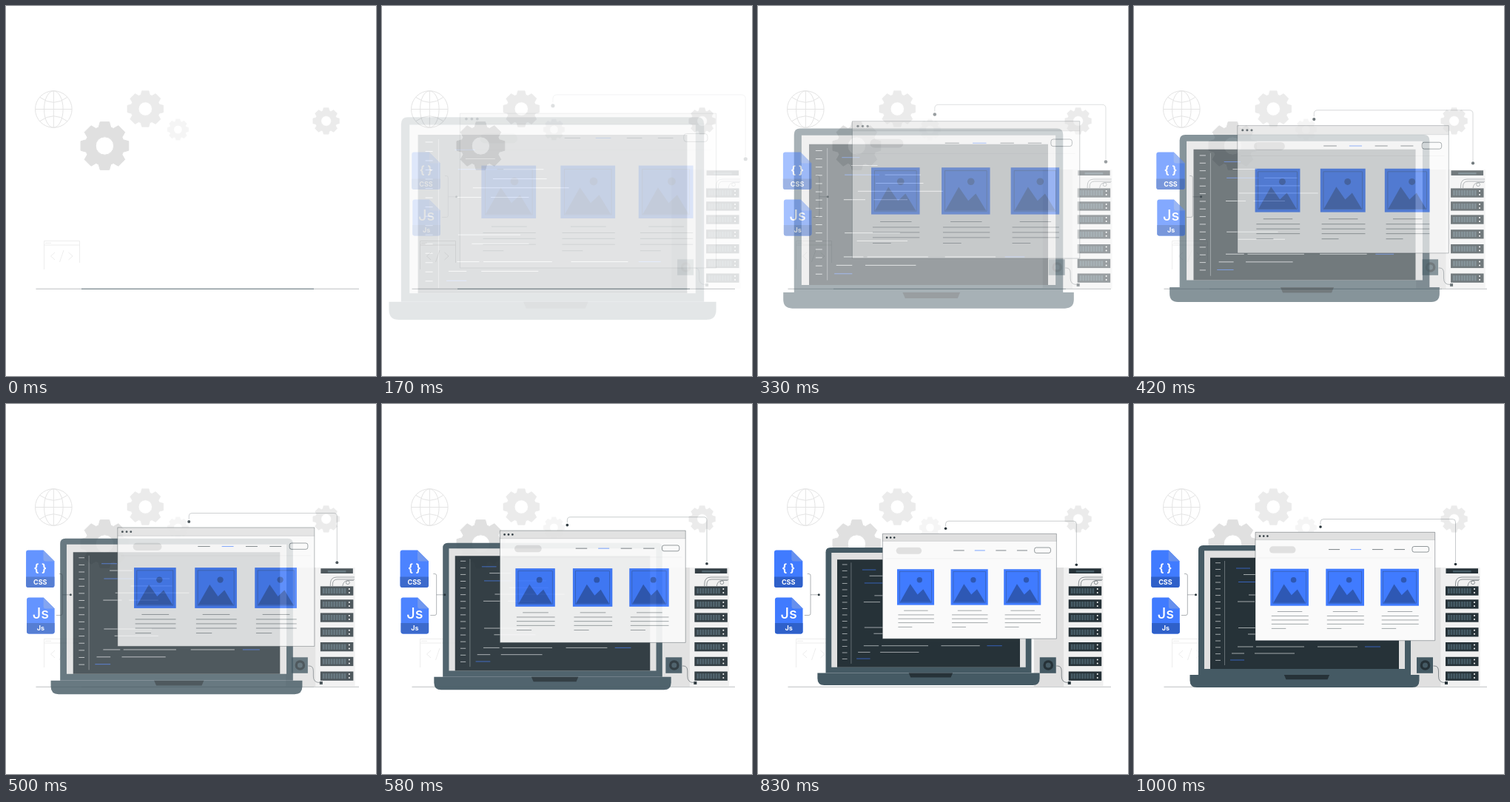
An HTML page for the animation above (1040 ms loop, 500 by 500 pixels).

```html
<!DOCTYPE html>
<html lang="en">
<head>
<meta charset="utf-8">
<title>Web development</title>
<style>
  html, body { margin: 0; width: 100%; height: 100%; overflow: hidden; background: #fff; }
  svg { display: block; width: 100vw; height: 100vh; }
  text { font-family: Inter, Roboto, sans-serif; text-anchor: middle; fill: #fff; }
  .thin { fill: none; stroke: #263238; stroke-width: .5; }
</style>
</head>
<body>
<svg viewBox="0 0 500 500">
  <g id="backdrop">
    <g fill="none" stroke="#e4e4e4" stroke-width="1">
      <circle cx="64.3" cy="139.5" r="24.8"/>
      <ellipse cx="64.3" cy="139.5" rx="12.8" ry="24.8"/>
      <path d="M64.3 114.700V164.300M39.500 139.500H89.100M46 123.500Q64.300 137 82.600 123.500M46 155.500Q64.300 142 82.600 155.500"/>
    </g>
    <g fill="none" stroke="#ebebeb" stroke-width=".9">
      <path d="M51.500 356V317.500H99.500V347M51.500 323H99.500M53 320.300H61"/>
      <path d="M66 333L60.500 338L66 343M78 330L72.500 346M84.500 333L90 338L84.500 343"/>
    </g>
    <path d="M40.500 382.300H477" stroke="#263238" stroke-width=".8" opacity=".38"/>
    <path id="midline" d="M102 382.300H416" stroke="#455a64" stroke-width=".9"/>
  </g>

  <g id="server">
    <path d="M374 221H415V382H374z" fill="#e0e0e0"/>
    <path d="M414.500 221H467.800V382H414.500z" fill="#f0f0f0"/>
    <path d="M421.500 222.300H465V229H421.500z" fill="#263238"/>
    <path d="M431 225H455.500V227.500H431z" fill="#455a64"/>
    <g class="thin">
      <path d="M434.500 246V243Q434.500 234 443 234H467M437.500 246V244Q437.500 237 444 237H467"/>
      <circle cx="458" cy="241.300" r="2.400"/>
      <path d="M451 246Q452 239 458 238.500H466"/>
      <path d="M404.500 354H406Q411.500 354 411.500 361V368Q411.500 376.500 420 376.500"/>
    </g>
    <path d="M420 375H424V379H420z" fill="#263238"/>
    <path d="M382 342.300H404V363.800H382z" fill="#455a64"/>
    <circle cx="393.500" cy="353" r="6.800" fill="#263238"/>
    <circle cx="393.500" cy="353" r="3.500" fill="#455a64"/>
  </g>

  <g id="laptop">
    <path d="M87 366V197.500Q87 191 93.500 191H367.500Q374 191 374 197.500V366z" fill="#455a64"/>
    <path d="M95 198.300H366V358H95z" fill="#e0e0e0"/>
    <path d="M103 207.800H358V358H103z" fill="#263238"/>
    <path d="M75.500 366H385.500V373.500Q385.500 383 376 383H85Q75.500 383 75.500 373.500z" fill="#455a64"/>
    <path d="M202.800 366H264.200L261.500 372.300H205.500z" fill="#263238"/>
    <path d="M122.500 212V353" stroke="#dfe3e5" stroke-width=".5" opacity=".7"/>
    <g id="code" stroke-width=".65"/>
  </g>

  <g id="browser">
    <path d="M164 173.300H406.700V319.700H164z" fill="#fafafa"/>
    <path d="M164 173.300H406.700V183.600H164z" fill="#e0e0e0"/>
    <path class="thin" opacity=".75" d="M164 173.300H406.700V319.700H164z"/>
    <path class="thin" opacity=".3" d="M164 183.600H406.700"/>
    <g fill="#263238">
      <circle cx="170" cy="178.500" r="1.300"/>
      <circle cx="175.200" cy="178.500" r="1.300"/>
      <circle cx="180.400" cy="178.500" r="1.300"/>
      <circle cx="252" cy="166" r="1.800"/>
      <circle cx="434.500" cy="216.500" r="1.800"/>
    </g>
    <rect x="183" y="192.300" width="35.500" height="9.300" rx="4.650" fill="#e0e0e0"/>
    <path d="M168 208H402" stroke="#ebebeb" stroke-width=".6"/>
    <path d="M263 196.600H278M322 196.600H336.500M351.500 196.600H366" stroke="#263238" stroke-width=".6"/>
    <path d="M292.500 196.600H307" stroke="#407bff" stroke-width=".7"/>
    <rect class="thin" x="376" y="192.500" width="22.500" height="7.600" rx="2.500"/>
    <path class="thin" opacity=".5" d="M252 163V159.500Q252 155.600 256 155.600H430.500Q434.500 155.600 434.500 159.500V214"/>
    <g id="cards"/>
  </g>

  <g id="docs">
    <path class="thin" opacity=".75" d="M68 229.500H70Q72.300 229.500 72.300 232V283Q72.300 285.500 70 285.500H64M72.300 257.800H83"/>
    <circle cx="83.500" cy="257.800" r="1.500" fill="#263238"/>
  </g>
</svg>
<script>
  const LOOP = 1040, STEP = 1000 / 24, LEAD = .83;
  const $ = id => document.getElementById(id);

  function add(parent, tag, attrs, text) {
    const el = document.createElementNS('http://www.w3.org/2000/svg', tag);
    for (const key in attrs) el.setAttribute(key, attrs[key]);
    if (text) el.textContent = text;
    parent.appendChild(el);
    return el;
  }

  function gear(cx, cy, r, hole, fill) {
    const pts = [];
    for (let i = 0; i < 8; i++) {
      const mid = i * Math.PI / 4 - Math.PI / 2;
      for (const [turn, size] of [[-.32, .79], [-.19, .99], [.19, .99], [.32, .79]]) {
        const a = mid + turn;
        pts.push((cx + r * size * Math.cos(a)).toFixed(2) + ' ' + (cy + r * size * Math.sin(a)).toFixed(2));
      }
    }
    const ring = `M${cx - hole} ${cy}a${hole} ${hole} 0 1 0 ${2 * hole} 0a${hole} ${hole} 0 1 0 ${-2 * hole} 0z`;
    add($('backdrop'), 'path', {
      d: `M${pts.join('L')}z${ring}`, fill, 'fill-rule': 'evenodd',
      stroke: fill, 'stroke-width': r * .03, 'stroke-linejoin': 'round'
    });
  }
  gear(133.4, 189, 33.3, 12.2, '#e0e0e0');
  gear(188.3, 139, 25, 9.2, '#ebebeb');
  gear(232.4, 167, 14.6, 5.6, '#f5f5f5');
  gear(432.6, 155.4, 18.3, 6.8, '#ebebeb');

  // Server racks
  for (const y of [246.4, 264.3, 282.4, 302.2, 322, 341.8, 361.5]) {
    const rack = add($('server'), 'g', { transform: `translate(421 ${y})` });
    add(rack, 'rect', { width: 44.5, height: 12.3, fill: '#263238' });
    for (let i = 0; i < 9; i++)
      add(rack, 'rect', { x: 3 + i * 3.6, y: 2.6, width: 2.7, height: 7.2, fill: '#455a64' });
    for (const dy of [3.6, 8.6])
      add(rack, 'circle', { cx: 39, cy: dy, r: 1, fill: '#fff' });
  }

  // Code on the laptop screen: x1, x2, y, is blue
  const code = [
    [138, 157, 222, 1], [148, 176, 230.5], [141, 178, 240.5, 1], [184, 222, 240.5],
    [174, 225, 249.5], [155, 246, 258], [140, 163, 267], [172, 208, 267], [141, 200, 302.5],
    [154, 208, 311], [140, 161, 328], [165, 230, 328], [248, 302, 328],
    [312, 333, 328, 1], [132, 149, 337], [163, 217, 337], [130, 149, 346, 1]
  ];
  for (const [x1, x2, y, blue] of code)
    add($('code'), 'path', { d: `M${x1} ${y}H${x2}`, stroke: blue ? '#407bff' : '#e6e9ea' });
  for (let i = 0; i < 16; i++)
    add($('code'), 'path', { d: `M110 ${214.7 + i * 8.78}h7`, stroke: '#e6e9ea' });

  // Page cards
  for (const x of [184.3, 259.3, 333.2]) {
    const card = add($('cards'), 'g', { transform: `translate(${x} 222.700)` });
    add(card, 'rect', { width: 51.7, height: 50, fill: '#407bff' });
    add(card, 'rect', { x: 3.5, y: 3.5, width: 44.7, height: 43, class: 'thin', opacity: .55 });
    add(card, 'path', { d: 'M4 46L18.300 20.800L28.500 35.500L36.500 27.800L47.500 46z', fill: '#2e58b4' });
    add(card, 'circle', { cx: 31.3, cy: 15, r: 3.8, fill: '#2e58b4' });
    add(card, 'path', {
      d: 'M9.500 57.800H43M1.500 63.700H51.500M1.500 69.200H51.500M1.500 74.700H51.500M1.500 80.700H21',
      stroke: '#263238', 'stroke-width': .55, opacity: .75
    });
  }

  // File icons
  function file(x, y, w, h, big, size, weight, label) {
    const icon = add($('docs'), 'g', { transform: `translate(${x} ${y})` });
    const fold = 15, band = h - 14.5;
    add(icon, 'path', {
      d: `M3 0H${w - fold}L${w} ${fold}V${h - 3}Q${w} ${h} ${w - 3} ${h}H3Q0 ${h} 0 ${h - 3}V3Q0 0 3 0z`, fill: '#407bff'
    });
    add(icon, 'path', { d: `M${w - fold} 0L${w} ${fold}H${w - fold + 3}Q${w - fold} ${fold} ${w - fold} ${fold - 3}z`, fill: '#6690ee' });
    add(icon, 'path', { d: `M0 ${band}H${w}V${h - 3}Q${w} ${h} ${w - 3} ${h}H3Q0 ${h} 0 ${h - 3}z`, fill: '#2f60c9' });
    add(icon, 'text', { x: w / 2, y: band - 6, 'font-size': size, 'font-weight': weight }, big);
    add(icon, 'text', { x: w / 2, y: h - 4.3, 'font-size': 9, 'font-weight': 700 }, label);
  }
  file(23.2, 197.4, 38.4, 50.6, '{ }', 15, 700, 'CSS');
  file(24.2, 261.4, 37.6, 49, 'Js', 20, 500, 'Js');

  const curve = (u, a, b) => 3 * u * (1 - u) ** 2 * a + 3 * u * u * (1 - u) * b + u ** 3;

  // Ease with a slight overshoot
  function ease(x) {
    if (x >= 1) return 1;
    let lo = 0, hi = 1;
    for (let i = 0; i < 30; i++) {
      const u = (lo + hi) / 2;
      if (curve(u, .36, .5) < x) lo = u; else hi = u;
    }
    return curve(lo, -.01, 1.38);
  }

  function place(id, p, transform) {
    $(id).setAttribute('transform', transform);
    $(id).setAttribute('opacity', Math.min(1, p));
  }

  function draw(time) {
    const k = Math.min(24, Math.floor((time % LOOP + 4) / STEP));
    const p = k < 2 ? 0 : ease((k + LEAD) / 24);
    const zoom = (x, y) => `translate(${x} ${y}) scale(${1.5 - .5 * p}) translate(${-x} ${-y})`;
    const slide = `translate(${20 * (1 - p)} 0)`;
    place('server', p, slide);
    place('docs', p, slide);
    place('laptop', p, zoom(230.5, 286.8));
    place('browser', p, zoom(301.4, 239.3));
    $('midline').setAttribute('opacity', Math.max(0, .8 * (1 - p)));
  }

  const start = performance.now();
  function tick() {
    draw(performance.now() - start);
    requestAnimationFrame(tick);
  }
  tick();
</script>
</body>
</html>
```
